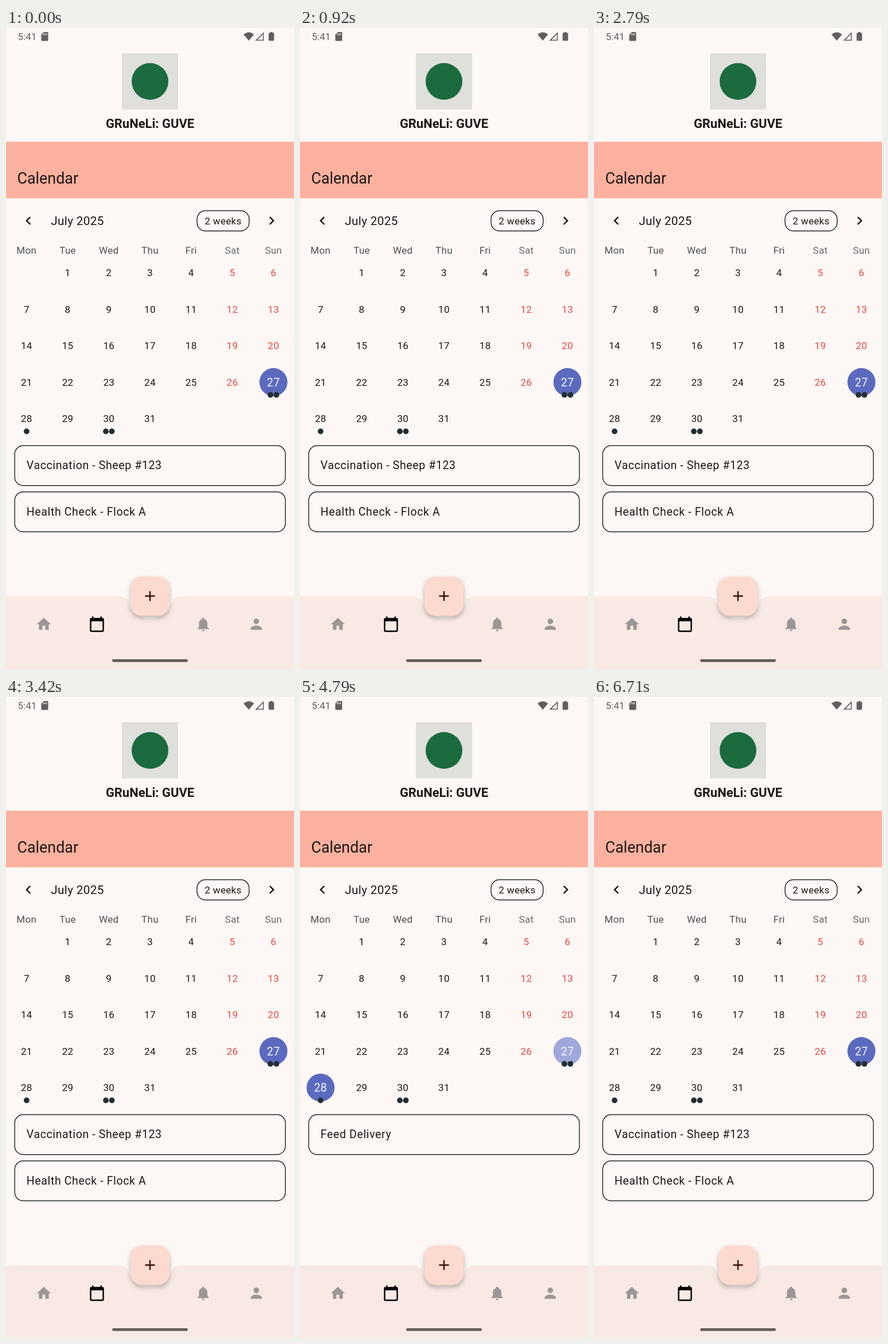
Animation, 502 px wide and 1116 px high, one loop 6750 ms. Source, as an HTML page with a canvas:

```html
<!DOCTYPE html>
<html lang="en">
<head>
<meta charset="utf-8">
<title>Calendar</title>
<style>
html, body { margin: 0; width: 100%; height: 100%; overflow: hidden; background: #fdf8f5; }
canvas { display: block; width: 502px; height: 1116px; }
</style>
</head>
<body>
<canvas id="stage" width="502" height="1116"></canvas>
<script>
const ctx = document.getElementById('stage').getContext('2d');
const W = 502, H = 1116, LOOP = 6750;
const DP = W / 411;
const COL = W / 7, ROW = 52 * DP, ROW_Y = 426;
const PICK_28 = 3500, PICK_27 = 5940, FADE = 250;

const INK = '#1d1715', GREY = '#9b9796', STATUS = '#625e5d', RED = '#e54a43';
const MARKERS = { 27: 2, 28: 1, 30: 2 };
const EVENTS = {
  27: ['Vaccination - Sheep #123', 'Health Check - Flock A'],
  28: ['Feed Delivery']
};
const ICONS = {
  left: 'M15.41 7.41L14 6l-6 6 6 6 1.41-1.41L10.83 12z',
  right: 'M10 6L8.59 7.41 13.17 12l-4.58 4.59L10 18l6-6z',
  home: 'M10 20v-6h4v6h5v-8h3L12 3 2 12h3v8z',
  calendar: 'M20 3h-1V1h-2v2H7V1H5v2H4c-1.1 0-2 .9-2 2v16c0 1.1.9 2 2 2h16c1.1 0 2-.9 2-2V5c0-1.1-.9-2-2-2zm0 18H4V8h16v13z',
  bell: 'M12 22c1.1 0 2-.9 2-2h-4c0 1.1.89 2 2 2zm6-6v-5c0-3.07-1.64-5.64-4.5-6.32V4c0-.83-.67-1.5-1.5-1.5s-1.5.67-1.5 1.5v.68C7.63 5.36 6 7.92 6 11v5l-2 2v1h16v-1l-2-2z',
  person: 'M12 12c2.21 0 4-1.79 4-4s-1.79-4-4-4-4 1.79-4 4 1.79 4 4 4zm0 2c-2.67 0-8 1.34-8 4v2h16v-2c0-2.66-5.33-4-8-4z',
  add: 'M19 13h-6v6h-2v-6H5v-2h6V5h2v6h6v2z'
};

function text(str, x, y, dp, color = INK, align = 'left', spacing = 0, weight = 400) {
  ctx.font = `${weight} ${dp * DP}px Roboto, sans-serif`;
  ctx.letterSpacing = `${spacing * DP}px`;
  ctx.textAlign = align;
  ctx.fillStyle = color;
  ctx.fillText(str, x, y);
}

function shape(d, color, x = 0, y = 0, scale = 1) {
  ctx.save();
  ctx.translate(x, y);
  ctx.scale(scale, scale);
  ctx.fillStyle = color;
  ctx.fill(new Path2D(d));
  ctx.restore();
}

const icon = (name, x, y, color = INK) =>
  shape(ICONS[name], color, x - 12 * DP, y - 12 * DP, DP);

function disc(x, y, r, color) {
  ctx.fillStyle = color;
  ctx.beginPath();
  ctx.arc(x, y, r, 0, Math.PI * 2);
  ctx.fill();
}

function box(x, y, w, h, r) {
  ctx.beginPath();
  ctx.roundRect(x, y, w, h, r);
}

function outline(x, y, w, h) {
  box(x, y, w, h, 12 * DP);
  ctx.strokeStyle = '#000';
  ctx.lineWidth = DP;
  ctx.stroke();
}

function statusBar() {
  text('5:41', 20.5, 20.5, 14, STATUS);
  shape('M66 7h6q1.5 0 1.5 1.5v12.5q0 1.5-1.5 1.5h-9q-1.5 0-1.5-1.5V11.5z', STATUS);
  for (let i = 0; i < 3; i++) {
    ctx.fillStyle = '#fdf8f5';
    ctx.fillRect(64.6 + i * 2.6, 9.5, 1.3, 3);
  }
  shape('M414 11.2q9.2-7.6 18.4 0L423.2 22z', STATUS);
  shape('M449.3 7v15h-15zm-1.6 4-9.3 9.4h9.3z', STATUS);
  shape('M460.5 7h4v1.6h1.4q1.4 0 1.4 1.4v10.8q0 1.4-1.4 1.4h-6.8q-1.4 0-1.4-1.4V10q0-1.4 1.4-1.4h1.4z', STATUS);
}

function header() {
  ctx.fillStyle = '#dfdfdc';
  ctx.fillRect(202, 44, 98, 98);
  disc(251, 93, 32, '#1b6b3f');
  text('GRuNeLi: GUVE', 251, 174, 18, INK, 'center', 0, 700);
  ctx.fillStyle = '#fdb19e';
  ctx.fillRect(0, 198, W, 98.5);
  text('Calendar', 19.5, 271, 22);
}

function monthBar() {
  icon('left', 39, 335.5);
  text('July 2025', 78.3, 343, 17, INK, 'left', 0.25);
  outline(333, 318.2, 90.8, 35.2);
  text('2 weeks', 378.5, 342, 14, INK, 'center', 0.25);
  icon('right', 463, 335.5);
  ['Mon', 'Tue', 'Wed', 'Thu', 'Fri', 'Sat', 'Sun'].forEach((name, i) =>
    text(name, COL * (i + 0.5), 393, 14, i > 4 ? '#6a6a6a' : '#4f4f4f', 'center', 0.25));
}

// Blend from today's pale tint to the selected fill.
function todayFill(k) {
  const mix = (a, b) => Math.round(a + (b - a) * k);
  return `rgb(${mix(159, 91)},${mix(168, 106)},${mix(218, 191)})`;
}

function days(selected, k28) {
  for (let day = 1; day <= 31; day++) {
    const col = day % 7, row = Math.floor(day / 7);
    const x = COL * (col + 0.5), y = ROW_Y + ROW * row;
    const bright = day === 27 || day === selected;
    if (day === 27) disc(x, y, 20 * DP, todayFill(1 - k28));
    if (day === 28 && k28 > 0) disc(x, y, 20 * DP, `rgba(91,106,191,${k28})`);
    const color = bright ? '#fafafa' : col > 4 ? RED : INK;
    text(day, x, y + (bright ? 7 : 6), bright ? 16 : 14, color, 'center', 0.25);
    const count = MARKERS[day] || 0;
    for (let i = 0; i < count; i++) {
      disc(x + (i - (count - 1) / 2) * 10.5, y + 22.2, 4.9, '#232e33');
    }
  }
}

function eventList(selected) {
  EVENTS[selected].forEach((name, i) => {
    const y = 727.2 + i * 80.5;
    outline(15.2, y, 471.8, 69.4);
    text(name, 35.8, y + 40.8, 16, INK, 'left', 0.5);
  });
}

function navBar() {
  const cx = 251, top = 989.5, r = 32 * DP;
  const a = r + DP, px = r * r / a, py = Math.sqrt(r * r - px * px);
  const angle = Math.atan2(py, px);
  ctx.fillStyle = '#f9e9e4';
  ctx.beginPath();
  ctx.moveTo(0, top);
  ctx.lineTo(cx - a - 15 * DP, top);
  ctx.quadraticCurveTo(cx - a, top, cx - px, top + py);
  ctx.arc(cx, top, r, Math.PI - angle, angle, true);
  ctx.quadraticCurveTo(cx + a, top, cx + a + 15 * DP, top);
  ctx.lineTo(W, top);
  ctx.lineTo(W, H);
  ctx.lineTo(0, H);
  ctx.fill();

  ctx.save();
  ctx.shadowColor = 'rgba(0,0,0,.28)';
  ctx.shadowBlur = 9;
  ctx.shadowOffsetY = 4;
  ctx.fillStyle = '#fddad0';
  box(217, 955, 68, 68.4, 16 * DP);
  ctx.fill();
  ctx.restore();
  icon('add', cx, 989, '#3a0b01');

  icon('home', 66, 1038, GREY);
  icon('calendar', 158.5, 1038, '#000');
  icon('bell', 343.7, 1038, GREY);
  icon('person', 436.3, 1038, GREY);
  ctx.fillStyle = '#625c5a';
  box(185, 1099, 132, 4.8, 2.4);
  ctx.fill();
}

function draw(now) {
  const t = now % LOOP;
  const ramp = start => Math.min(1, Math.max(0, (t - start) / FADE));
  const selected = t >= PICK_28 && t < PICK_27 ? 28 : 27;
  ctx.fillStyle = '#fdf8f5';
  ctx.fillRect(0, 0, W, H);
  statusBar();
  header();
  monthBar();
  days(selected, ramp(PICK_28) - ramp(PICK_27));
  eventList(selected);
  navBar();
}

const begin = performance.now();
function tick() {
  draw(performance.now() - begin);
  requestAnimationFrame(tick);
}
tick();
</script>
</body>
</html>
```
